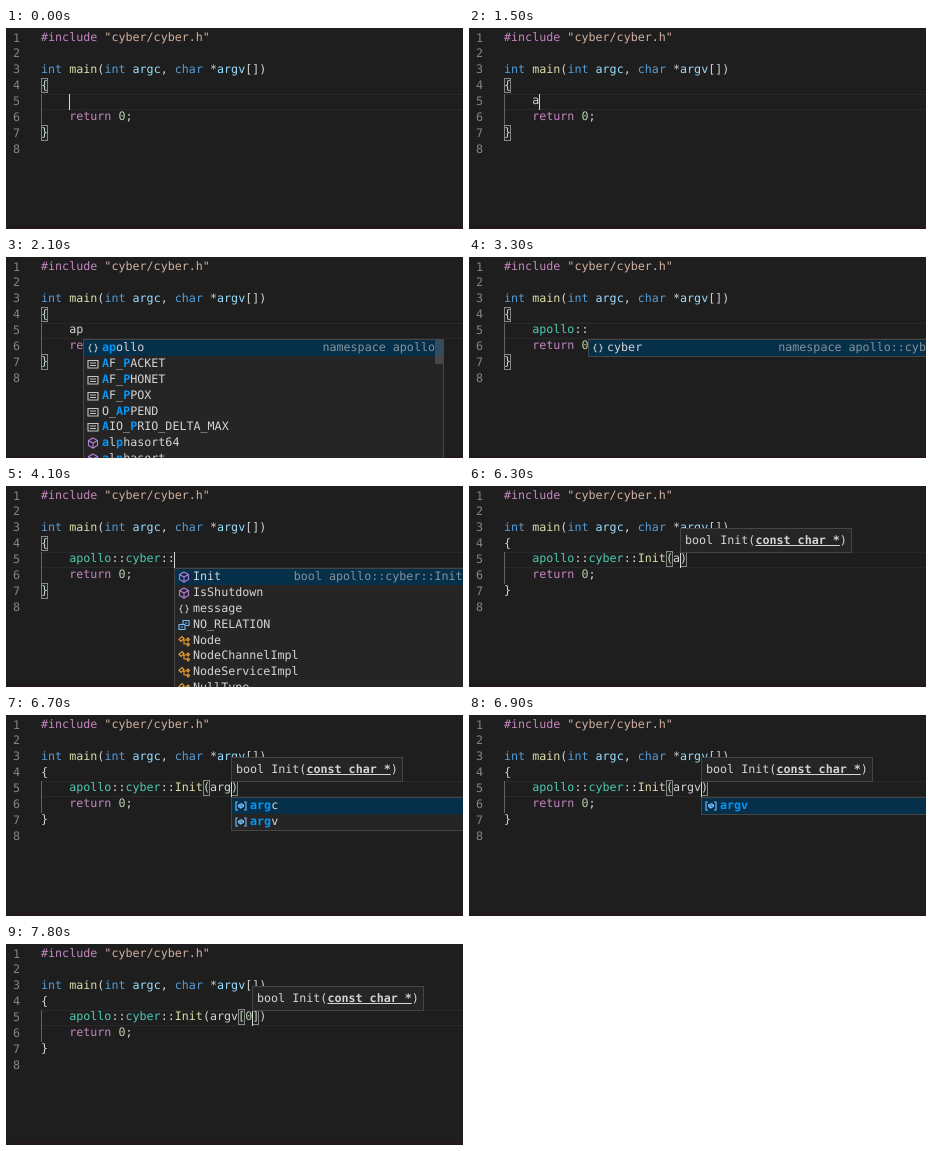
An HTML page for the animation above (8 s loop, 457 by 201 pixels).

```html
<!DOCTYPE html>
<html lang="en">
<head>
<meta charset="utf-8">
<title>Editor autocompletion</title>
<style>
  html, body { margin: 0; width: 100%; height: 100%; overflow: hidden; background: #1e1e1e; }
  #stage {
    position: relative; width: 457px; height: 201px; overflow: hidden;
    background: #1e1e1e; color: #d4d4d4;
    font: 11.7px/15.88px "DejaVu Sans Mono", monospace;
    text-rendering: geometricPrecision; white-space: pre;
  }
  #stage > * { position: absolute; box-sizing: border-box; }
  #numbers { left: 7px; top: 2.5px; color: #858585; }
  #code { left: 35px; top: 1.9px; }
  #current { left: 35px; top: 66px; width: 440px; height: 16px; border: 1.5px solid #292929; }
  #guide { left: 35px; top: 66px; width: 1px; height: 32px; background: #646464; }
  #strip { left: 0; top: 198px; width: 457px; height: 3px; background: #22191b; }
  #cursor { top: 66px; width: 1px; height: 16px; background: #d8d8d4; }

  .keyword { color: #c586c0; }
  .string { color: #d0b0a0; }
  .type { color: #569cd6; }
  .call { color: #dcdcaa; }
  .scope { color: #4ec9b0; }
  .number { color: #b5cea8; }
  .param { color: #9cdcfe; }
  .bracket { display: inline-block; height: 15.88px; vertical-align: top;
             background: #0064001a; box-shadow: inset 0 0 0 1px #888; }

  #list { top: 82px; width: 361px; border: 1px solid #454545; background: #252526; }
  .row { position: relative; height: 15.88px; line-height: 14.5px; padding-left: 18px; }
  .row:first-child { background: #062f4a; }
  .row svg { position: absolute; left: 3px; top: 2px; width: 12px; height: 12px;
             fill: none; stroke-width: 1.1; }
  .row b { color: #0097fb; }
  .detail { position: absolute; right: 8px; opacity: .6; }
  .thumb { position: absolute; right: 0; top: 0; width: 8px; height: 24px; background: #79797966; }

  #hint { top: 42px; height: 25px; line-height: 23px; padding: 0 4px;
          border: 1px solid #454545; background: #252526; }
  #hint b { text-decoration: underline; }
</style>
</head>
<body>
<div id="stage">
  <div id="current"></div>
  <div id="guide"></div>
  <div id="strip"></div>
  <div id="numbers"></div>
  <div id="code"></div>
  <div id="cursor"></div>
  <div id="list"></div>
  <div id="hint">bool Init(<b>const char *</b>)</div>
</div>
<script>
const LOOP = 8000, CHAR = 7.045, LEFT = 35 + 4 * CHAR;
const $ = id => document.getElementById(id);

const ICONS = {
  namespace: ['#c5c5c5', 'M4.5 2Q3 2 3 4T1.5 6Q3 6 3 8T4.5 10M7.5 2Q9 2 9 4T10.5 6Q9 6 9 8T7.5 10'],
  constant: ['#c5c5c5', 'M1 2.5h10v7.5h-10zM3 5h6M3 7.5h6'],
  method: ['#b180d7', 'M6 1 10.5 3.5v5L6 11 1.5 8.5v-5ZM1.5 3.5 6 6l4.5-2.5M6 6v5'],
  enum: ['#75beff', 'M5 5V1.5h6v5H8M1 5.5h6v5H1zM7 4h2M3 8h2'],
  class: ['#ee9d28', 'M1 4.5 4 1.5 6 3.5 3 6.5ZM5 5h4M6 5v4h3M9 4l1-1 1.5 1.5-1.5 1.5ZM9 9l1-1 1.5 1.5-1.5 1.5Z'],
  variable: ['#75beff', 'M3 2H1v8h2M9 2h2v8H9M3.5 6.5V5l3-1.3L8.5 5v1.5l-3 1.5ZM3.5 5l2 1 3-1M5.5 6v2'],
};

// Square brackets in a label mark the matched letters.
const item = (icon, label, detail = '') => ({ icon, label, detail });
const items = (icon, names) => names.split(' ').map(name => item(icon, name));

const macros = items('constant', '[A]F_[P]ACKET [A]F_[P]HONET [A]F_[P]POX O_[AP]PEND [A]IO_[P]RIO_DELTA_MAX');
const sorts = items('method', '[a]l[p]hasort64 [a]l[p]hasort');
const apollo = detail => [item('namespace', '[ap]ollo', detail), ...macros, ...sorts];
const cyber = [item('namespace', 'cyber', 'namespace apollo::cyber')];
const initDetail = 'bool apollo::cyber::Init(const …)';
const members = [
  item('method', 'Init', initDetail), item('method', 'IsShutdown'),
  item('namespace', 'message'), item('enum', 'NO_RELATION'),
  ...items('class', 'Node NodeChannelImpl NodeServiceImpl NullType'),
];
const filtered = [
  item('method', '[I]nit', initDetail), item('method', '[I]sShutdown'),
  ...items('class', 'NodeChannel[I]mpl NodeService[I]mpl'),
  item('enum', 'NO_RELAT[I]ON'), item('method', 'Wa[i]tForShutdown'),
];
const args = match => items('variable', 'argc argv').map(
  ({ icon, label }) => item(icon, label.replace(match, '[$&]')));
const argv = items('variable', '[argv]');

// time, typed text with | as the cursor, suggestions, column of the parameter hint
const scope = 'apollo::cyber::', call = scope + 'Init';
const scenes = [
  [0, '|'],
  [1500, 'a|'],
  [1700, 'ap|'],
  [1800, 'ap|', apollo('')],
  [1900, 'ap|', apollo('namespace apollo')],
  [2300, 'apollo|'],
  [2700, 'apollo:|'],
  [2800, 'apollo::|'],
  [2900, 'apollo::|', cyber],
  [3500, 'apollo::cyber|'],
  [3900, 'apollo::cyber:|'],
  [4100, scope + '|', members],
  [5000, scope + 'I|', filtered],
  [5300, call + '|'],
  [6100, call + '(|)'],
  [6200, call + '(|)', null, 20],
  [6300, call + '(a|)', null, 21],
  [6500, call + '(a|)', [...args('a'), ...apollo('')], 21],
  [6600, call + '(ar|)', args('ar'), 22],
  [6700, call + '(arg|)', args('arg'), 23],
  [6800, call + '(argv|)', null, 24],
  [6900, call + '(argv|)', argv, 24],
  [7500, call + '(argv[|])', null, 24],
  [7600, call + '(argv[|])', null, 25],
  [7700, call + '(argv[0|])', null, 25],
  [7800, call + '(argv[0|])', null, 26],
];
const blinks = [[200, 600], [1100, 1500], [2100, 2300], [3300, 3500],
                [4800, 5000], [5800, 6100], [7300, 7500]];

const CLASSES = ['keyword', 'string', 'type', 'call', 'scope', 'number', 'param', 'bracket'];
const TOKENS = /(#include|return)|("[^"]*")|\b(int|char)\b|(main|Init)(?=‹?\()|(\w+)(?=::)|(\d)|(argc|(?<=\*)argv)|‹(.)›/g;
const paint = text => text.replace(TOKENS, (token, ...groups) => {
  const kind = groups.findIndex((group, i) => i < CLASSES.length && group);
  return `<span class="${CLASSES[kind]}">${groups[kind]}</span>`;
});

const columnX = column => Math.floor(LEFT + column * CHAR);

function rowHtml({ icon, label, detail }) {
  const [color, path] = ICONS[icon];
  const text = label.replace(/\[(\w+)\]/g, '<b>$1</b>');
  return `<div class="row"><svg viewBox="0 0 12 12" stroke="${color}"><path d="${path}"/></svg>`
    + `${text}<span class="detail">${detail}</span></div>`;
}

function show([, typed, list, hint]) {
  const x = columnX(typed.indexOf('|'));
  const boxed = typed.replace(/([[(])(\w*)\|([\])])/, '‹$1›$2‹$3›').replace('|', '');
  const [open, close] = boxed.includes('‹') ? ['{', '}'] : ['‹{›', '‹}›'];
  $('code').innerHTML = paint([
    '#include "cyber/cyber.h"', '', 'int main(int argc, char *argv[])',
    open, '    ' + boxed, '    return 0;', close,
  ].join('\n'));
  $('cursor').style.left = x + 'px';

  $('list').hidden = !list;
  if (list) {
    $('list').style.left = x + 'px';
    $('list').innerHTML = list.map(rowHtml).join('')
      + (list.length > 7 ? '<div class="thumb"></div>' : '');
  }
  $('hint').hidden = !hint;
  if (hint) $('hint').style.left = columnX(hint) + 'px';
}

$('numbers').textContent = [1, 2, 3, 4, 5, 6, 7, 8].join('\n');

let shown;
const start = performance.now();
function frame() {
  const t = (performance.now() - start) % LOOP;
  const scene = scenes.findLast(([time]) => time <= t);
  if (scene !== shown) show(shown = scene);
  $('cursor').hidden = blinks.some(([from, to]) => t >= from && t < to);
  requestAnimationFrame(frame);
}
frame();
</script>
</body>
</html>
```
